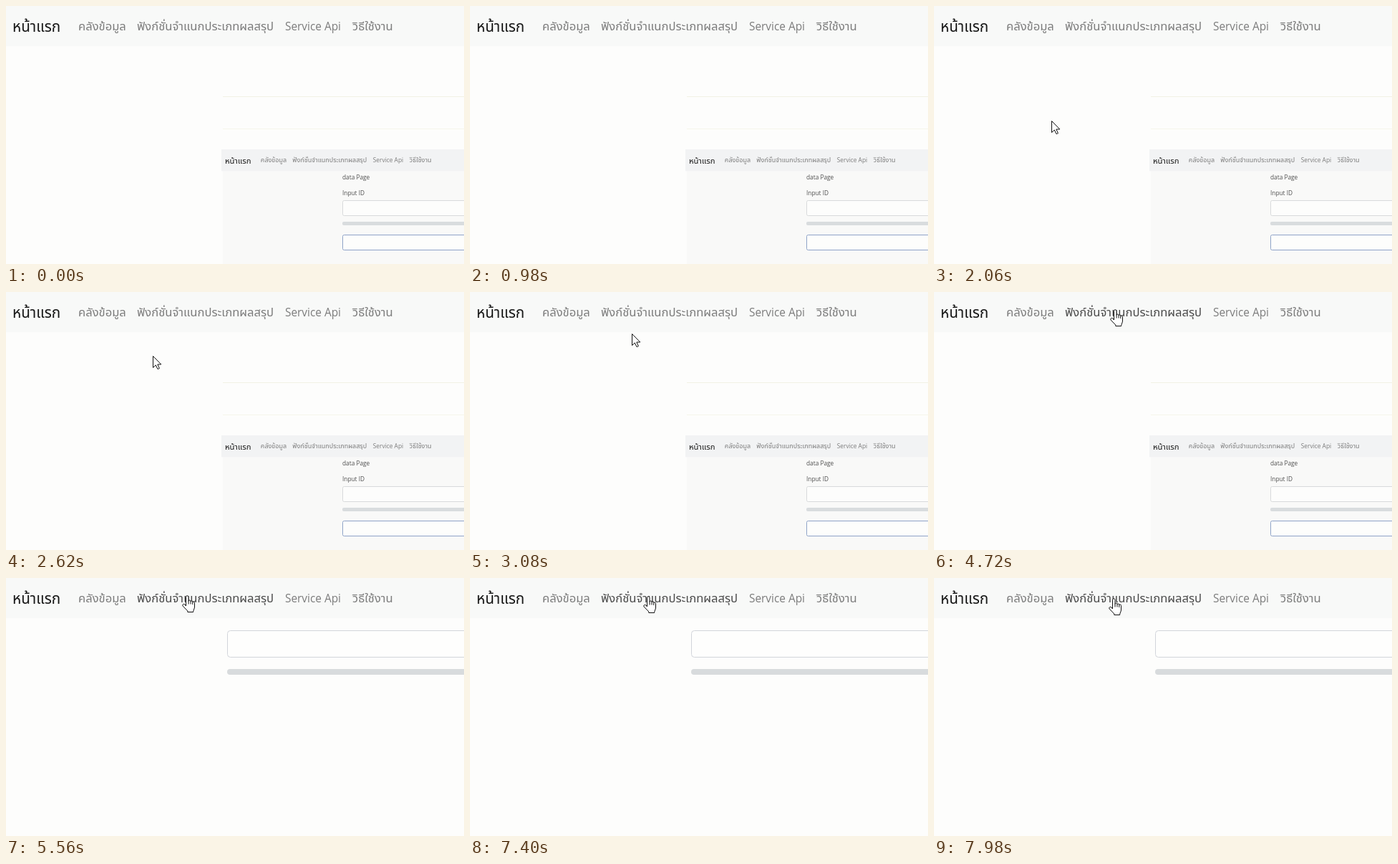
Recreate the animation shown at these times as an HTML page with a canvas. Size 640 px wide and 360 px high, loop 8 s.

```html
<!DOCTYPE html>
<html lang="th">
<head>
<meta charset="utf-8">
<style>
html, body { margin: 0; width: 100%; height: 100%; overflow: hidden; background: #fdfdfc; }
canvas { display: block; width: 640px; height: 360px; }
</style>
</head>
<body>
<canvas id="stage" width="640" height="360"></canvas>
<script>
const ctx = document.getElementById('stage').getContext('2d');
const LOOP = 8000;
const PAGE_SWITCH = 4820;
const HAND_FROM = 3400;
const FONT = '"Open Sans", "Noto Sans Thai Looped", "Noto Sans Thai", "Noto Sans", sans-serif';

const LINKS = [
  ['คลังข้อมูล', 101, 16.6],
  ['ฟังก์ชั่นจำแนกประเภทผลสรุป', 183, 16.6],
  ['Service Api', 390, 15.4],
  ['วิธีใช้งาน', 484, 16.6]
];

// Pointer hotspot: time, x, y
const PATH = [
  [1640, 128, 362], [1820, 140, 270], [1920, 140, 270], [2060, 164, 160],
  [2660, 208, 84], [2760, 208, 84], [3080, 226, 58], [3180, 226, 58],
  [3500, 253, 24], [7380, 253, 24], [7400, 249, 25], [7420, 245, 26],
  [7540, 245, 26], [7740, 253, 27], [7980, 251, 28]
];

const ARROW = new Path2D('M.5.5V16.5L4.3 13L7 18.6L9.4 17.5L6.8 12H11.8Z');
const HAND = new Path2D('M5.5 15V2.5a1.75 1.75 0 0 1 3.5 0V8.5q0-1.5 1.5-1.5t1.5 1.5v.5' +
  'q0-1 1.4-1t1.4 1.2v.8q.2-1 1.4-1t1.3 1.5v5.5q0 2-1 4l-.8 2.2V23.5H7.8V22' +
  'L1.2 15.2q-1-1.4.2-2.4t2.6.2Z');
const KNUCKLES = new Path2D('M9 8.5v4M12 9v3.5M14.8 10v3');

function rect(x, y, w, h, color) {
  ctx.fillStyle = color;
  ctx.fillRect(x, y, w, h);
}

function text(str, x, y, size, color) {
  ctx.font = `${size}px ${FONT}`;
  ctx.fillStyle = color;
  ctx.fillText(str, x, y);
}

function rounded(x, y, w, h, r, fill, stroke) {
  ctx.beginPath();
  ctx.roundRect(x, y, w, h, r);
  if (fill) { ctx.fillStyle = fill; ctx.fill(); }
  if (stroke) { ctx.strokeStyle = stroke; ctx.lineWidth = 1; ctx.stroke(); }
}

function navbar(x, y, scale, color, active) {
  ctx.save();
  ctx.translate(x, y);
  ctx.scale(scale, scale);
  rect(0, 0, 640, 56, color);
  text('หน้าแรก', 9, 36, 20.7, '#181818');
  LINKS.forEach(([label, lx, size], i) =>
    text(label, lx, 34, size, i === active ? '#4a4a4a' : '#7c7c7c'));
  ctx.restore();
}

function homePage() {
  rect(303, 126, 337, 1, '#f2f2e4');
  rect(303, 171, 337, 1, '#f6f6ea');
  rect(303, 200, 337, 160, '#f9f9f8');
  navbar(301, 200, .543, '#f2f3f4', -1);
  text('data Page', 470, 242, 8.3, '#505050');
  text('Input ID', 470, 264, 8.3, '#505050');
  rounded(470.5, 271.5, 220, 21, 2, '#fdfdfc', '#d8dadb');
  rounded(470, 301, 220, 5, 2, '#d9dcde');
  rounded(470.5, 319.5, 220, 21, 2, '#fdfdfc', '#8fa3c8');
}

function formPage() {
  rounded(309.5, 73.5, 400, 37, 4, '#fefefd', '#d2d5da');
  rounded(309, 127, 400, 8, 4, '#d8dbdd');
}

function pointerAt(t) {
  if (t < PATH[0][0]) return null;
  const i = PATH.findIndex(p => p[0] > t);
  if (i < 0) return PATH[PATH.length - 1].slice(1);
  const [t0, x0, y0] = PATH[i - 1];
  const [t1, x1, y1] = PATH[i];
  const k = (t - t0) / (t1 - t0);
  return [x0 + (x1 - x0) * k, y0 + (y1 - y0) * k];
}

function pointer(pos, hand) {
  ctx.save();
  ctx.translate(Math.round(pos[0]) - (hand ? 7 : 0), Math.round(pos[1]));
  ctx.lineWidth = 1;
  ctx.lineJoin = 'round';
  ctx.fillStyle = '#fff';
  ctx.strokeStyle = '#111';
  const shape = hand ? HAND : ARROW;
  ctx.fill(shape);
  ctx.stroke(shape);
  if (hand) ctx.stroke(KNUCKLES);
  ctx.restore();
}

function draw(now) {
  const t = now % LOOP;
  const hand = t >= HAND_FROM;
  rect(0, 0, 640, 360, '#fdfdfc');
  navbar(0, 0, 1, '#f8f9f8', hand ? 1 : -1);
  if (t < PAGE_SWITCH) homePage();
  else formPage();
  const pos = pointerAt(t);
  if (pos) pointer(pos, hand);
  requestAnimationFrame(() => draw(performance.now()));
}

draw(0);
</script>
</body>
</html>
```
